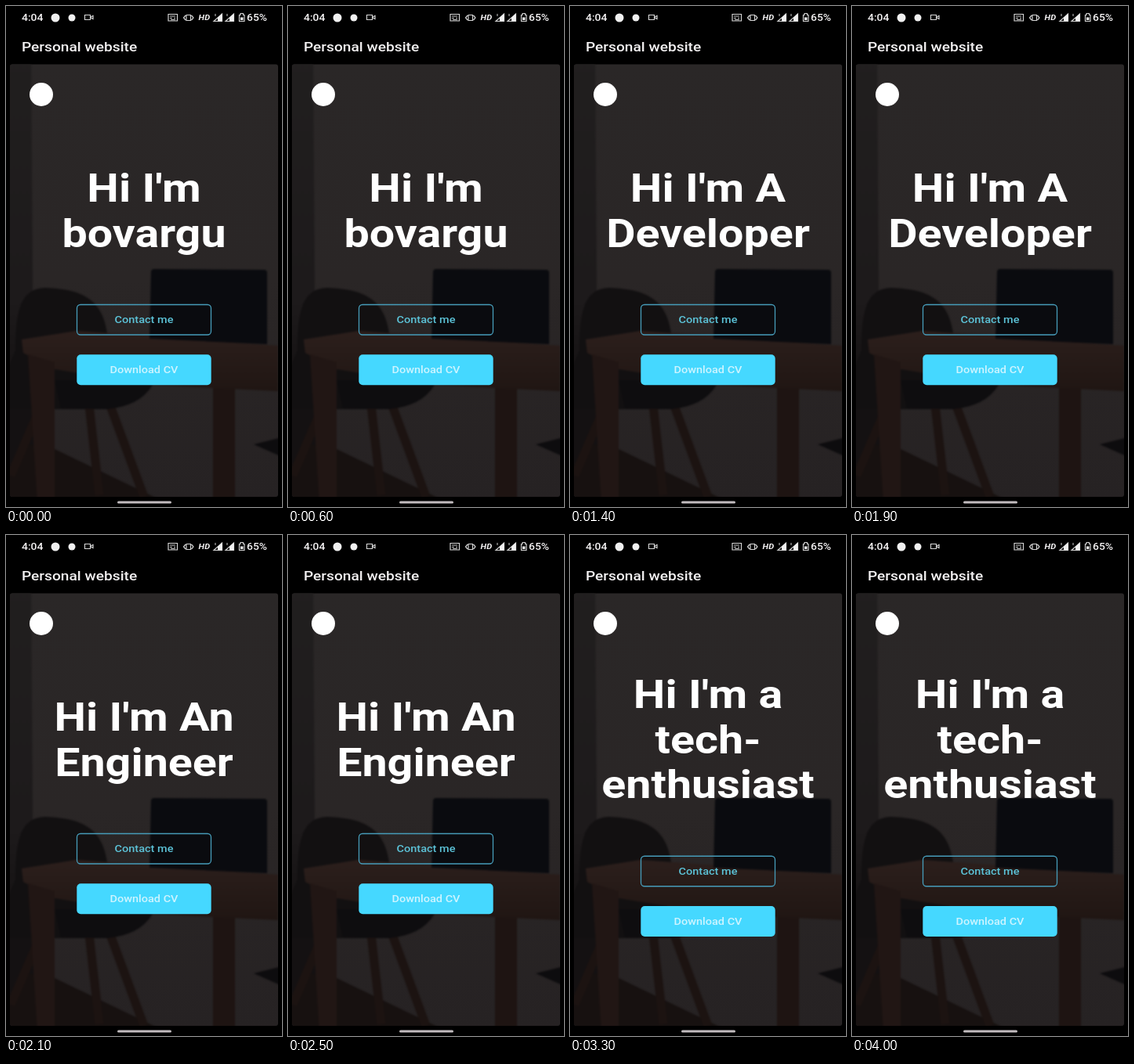
These frames come from a looping animation (352x640 px, 4.1 s). An HTML page:

```html
<!DOCTYPE html>
<html lang="en">
<head>
<meta charset="utf-8">
<title>Personal website</title>
<style>
  html, body { margin: 0; width: 100%; height: 100%; overflow: hidden; background: #000; }
  svg { display: block; width: 352px; height: 640px; }
  text { font-family: Roboto, sans-serif; font-weight: 500; fill: #f4f2f3; }
  .mid { text-anchor: middle; }
  .headline { font-size: 49.5px; font-weight: 700; fill: #fff; }
  .button { font-size: 12.5px; }
  .status { font-size: 12px; }
  .line { fill: none; stroke: #d4d4d4; stroke-width: 1.2; }
</style>
</head>
<body>
<svg viewBox="0 0 352 640">
  <defs>
    <linearGradient id="wall" x2="0" y2="1">
      <stop offset="0" stop-color="#2a2727"/>
      <stop offset=".5" stop-color="#2a2626"/>
      <stop offset="1" stop-color="#262223"/>
    </linearGradient>
    <linearGradient id="side" x2="0" y2="1">
      <stop offset="0" stop-color="#211f1f"/>
      <stop offset=".55" stop-color="#1d1a1b"/>
      <stop offset=".75" stop-color="#141112"/>
    </linearGradient>
    <linearGradient id="wood" x2="0" y2="1">
      <stop offset="0" stop-color="#2c1f1c"/>
      <stop offset="1" stop-color="#201613"/>
    </linearGradient>
    <filter id="soft" color-interpolation-filters="sRGB"><feGaussianBlur stdDeviation="1.3"/></filter>
    <clipPath id="panel"><rect x="5" y="74.500" width="342" height="552.500" rx="3"/></clipPath>
  </defs>

  <!-- dimmed room -->
  <g clip-path="url(#panel)">
    <rect y="70" width="352" height="560" fill="url(#wall)"/>
    <g filter="url(#soft)">
      <path d="M-5 65H32L36 635H-5Z" fill="url(#side)"/>
      <path d="M-5 600L30 560L62 566L205 635H-5Z" fill="#171110"/>
      <path d="M316 560L352 551V576Z" fill="#0d0c0e"/>
      <path d="M12 440C12 385 20 361 50 360C95 362 125 372 130 425L120 515H-5V480Z" fill="#121011"/>
      <path d="M264 470H292V635H264Z" fill="#1e1412"/>
      <path d="M45 510L6 600M106 510L119 625M132 508L176 627" stroke="#1c1311" stroke-width="11"/>
      <path d="M62 478H190Q176 510 130 515L70 514Z" fill="#0e0d0f"/>
      <path d="M20 426L90 415L347 434V492L186 484L62 464L22 443Z" fill="url(#wood)"/>
      <path d="M28 445L62 455V635H40Z" fill="#211614"/>
      <path d="M185 340Q185 336 189 336L329 337Q333 337 333 341V432L183 425Z" fill="#0a0b0f"/>
    </g>
  </g>

  <!-- status bar -->
  <g fill="#f0f0f0">
    <circle cx="63" cy="15" r="5.500"/>
    <circle cx="84" cy="15" r="4.500"/>
    <path class="line" d="M100.500 11.500H107.500V17.500H100.500ZM108 14L111 12.500V16.500L108 15"/>
    <path class="line" d="M207 19V10.500H218.500V19ZM209 13H216M209 15.500H212M214 15.500H216M210 17.500H216"/>
    <path class="line" d="M230 11.500H235.500V18.500H230ZM229 12L226.500 15L229 18M236.500 12L239 15L236.500 18"/>
    <path class="line" d="M265 19.500L275.500 10V19.500ZM280 19.500L290.500 10V19.500Z"/>
    <path d="M270 19.500V15L275.500 10V19.500ZM285 19.500V15L290.500 10V19.500Z"/>
    <path d="M267 10V13M282 10V13" stroke="#ccc"/>
    <path class="line" d="M297.500 11.500H299V9.500H302.500V11.500H304V19.500H297.500Z"/>
    <path d="M299 14.500H302.500V18H299Z"/>
  </g>

  <circle cx="45" cy="113" r="15" fill="#fff"/>
  <rect x="142" y="632.500" width="69" height="3" rx="1.500" fill="#c2bcbf"/>

  <g class="buttons">
    <rect x="90.500" y="381.500" width="171" height="38.500" rx="4.500" fill="none" stroke="#469cb9" stroke-width="1.300"/>
    <rect x="90.300" y="445.300" width="171.400" height="39" rx="5" fill="#45d8ff"/>
  </g>

  <!-- the phone screen is shown wider than it is, so all type shares one aspect -->
  <g transform="translate(176) scale(1.16 1)">
    <text class="status" x="-134.500" y="19">4:04</text>
    <text x="60" y="18.500" font-size="9.500" font-style="italic" style="font-weight:700">HD</text>
    <text class="status" x="113" y="19">65%</text>
    <text x="-134.500" y="58.500" font-size="16.500">Personal website</text>
    <g id="headline"></g>
    <g class="buttons">
      <text class="button mid" y="405" style="fill:#5cc3d8">Contact me</text>
      <text class="button mid" y="469" style="fill:#cdf4ff">Download CV</text>
    </g>
  </g>
</svg>
<script>
  const LOOP = 4100, LINE = 57.5, MIDDLE = 279;
  const slides = [
    { from: 0, lines: ["Hi I'm", "bovargu"] },
    { from: 900, lines: ["Hi I'm A", "Developer"] },
    { from: 2000, lines: ["Hi I'm An", "Engineer"] },
    { from: 3200, lines: ["Hi I'm a", "tech-", "enthusiast"] }
  ];
  const headline = document.getElementById("headline");
  const buttons = document.querySelectorAll(".buttons");
  let current;

  function show({ lines }) {
    const top = MIDDLE - (lines.length - 1) * LINE / 2;
    headline.innerHTML = lines.map((line, i) =>
      `<text class="headline mid" y="${top + i * LINE}">${line}</text>`).join("");
    const shift = (lines.length - 2) * LINE / 2;
    buttons.forEach(g => g.setAttribute("transform", `translate(0 ${shift})`));
  }

  function tick() {
    const time = performance.now() % LOOP;
    const slide = slides.findLast(s => time >= s.from);
    if (slide !== current) show(current = slide);
    requestAnimationFrame(tick);
  }
  tick();
</script>
</body>
</html>
```
